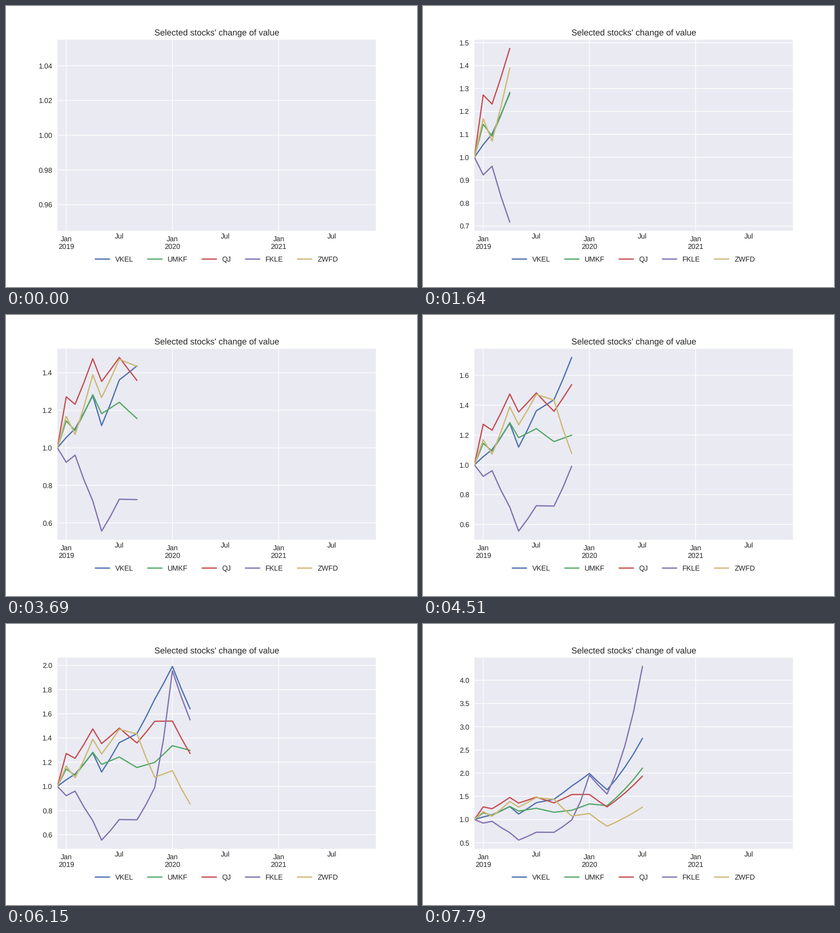
A matplotlib script that plays this animation: 903x620 px, repeating every 8 s.

```python
import numpy as np
import matplotlib.pyplot as plt
from matplotlib.animation import FuncAnimation

WIDTH, HEIGHT = 903, 620
DPI = WIDTH / 8
LOOP_MS, INTERVAL_MS, STEP_MS = 8000, 40, 410

# Turning points, in months since December 2018; values grow at a steady rate between them.
KEY_MONTHS = [0, 1, 2, 4, 5, 7, 9, 11, 13, 15, 19]
KEY_VALUES = {
    "VKEL": [1, 1.055, 1.102, 1.278, 1.119, 1.362, 1.437, 1.720, 1.992, 1.641, 2.750],
    "UMKF": [1, 1.144, 1.092, 1.283, 1.182, 1.243, 1.156, 1.199, 1.337, 1.298, 2.107],
    "QJ": [1, 1.272, 1.232, 1.475, 1.354, 1.482, 1.359, 1.538, 1.540, 1.272, 1.935],
    "FKLE": [1, 0.923, 0.961, 0.717, 0.556, 0.726, 0.724, 0.991, 1.955, 1.550, 4.299],
    "ZWFD": [1, 1.168, 1.071, 1.389, 1.268, 1.472, 1.434, 1.076, 1.130, 0.855, 1.267],
}

plt.style.use("seaborn-v0_8")
plt.rcParams.update({
    "font.family": "Liberation Sans",
    "text.hinting": "none",
    "path.snap": False,
})

# The small surplus keeps the pixel height from rounding down.
fig, ax = plt.subplots(figsize=(WIDTH / DPI, (HEIGHT + 0.001) / DPI), dpi=DPI)
fig.subplots_adjust(left=0.125, right=0.9, bottom=0.2, top=0.88)

ax.set_title("Selected stocks' change of value")
ax.set_xlim(0, 36)
ax.set_xticks([1, 13, 25], [f"Jan\n{year}" for year in (2019, 2020, 2021)])
ax.set_xticks([7, 19, 31], ["Jul"] * 3, minor=True)

lines = {name: ax.plot([], [], label=name)[0] for name in KEY_VALUES}
ax.legend(loc="upper center", bbox_to_anchor=(0.5, -0.1), ncol=len(lines))


def values_at(months, keys):
    return np.exp(np.interp(months, KEY_MONTHS, np.log(keys)))


def update(frame):
    last_month = ((frame + 1) * INTERVAL_MS - 1) // STEP_MS
    months = np.arange(last_month + 1)
    for name, line in lines.items():
        line.set_data(months, values_at(months, KEY_VALUES[name]))
    ax.relim()
    ax.autoscale_view(scalex=False)
    return list(lines.values())


anim = FuncAnimation(fig, update, frames=LOOP_MS // INTERVAL_MS, interval=INTERVAL_MS,
                     init_func=lambda: update(0), repeat=True, repeat_delay=0)
plt.show()
```
